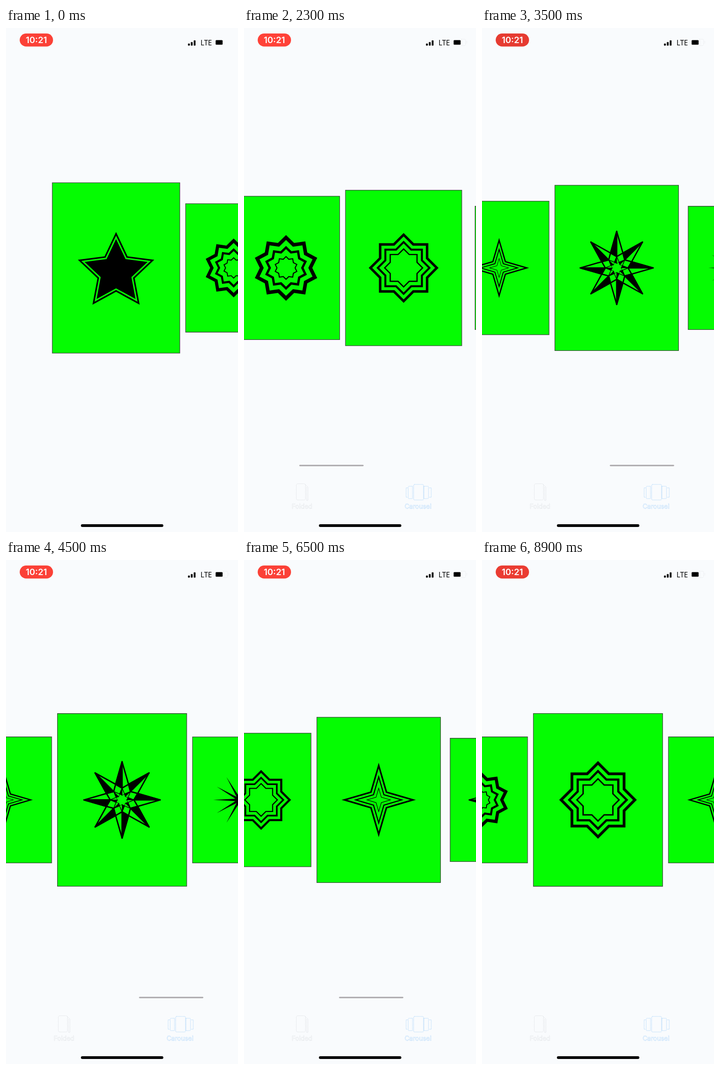
An HTML page that plays this animation: 508 by 1102 pixels, repeating every 9000 ms.

```html
<!DOCTYPE html>
<html lang="en">
<head>
<meta charset="utf-8">
<title>Card carousel</title>
<style>
  html, body { margin: 0; width: 100%; height: 100%; overflow: hidden; background: #f9fbfd; }
  svg { display: block; width: 100vw; height: 100vh; }
  .tab { fill: none; stroke-width: .7; stroke-dasharray: 1.5 1.2; }
  .tab text { font: 14px Inter, sans-serif; text-anchor: middle; stroke-width: .5; }
</style>
</head>
<body>
<svg viewBox="0 0 508 1102">
  <rect width="508" height="1102" fill="#f9fbfd"/>
  <g id="cards"></g>
  <rect id="bar" y="955" height="3.2" rx="1.6" fill="#b0adb0"/>

  <rect id="pill" x="30" y="12" width="73" height="28.5" rx="14.2"/>
  <text x="66.5" y="33.3" font-family="Inter, sans-serif" font-size="19" font-weight="600" fill="#fff" text-anchor="middle">10:21</text>
  <g>
    <rect x="398.5" y="34" width="4" height="4.5" rx="1"/>
    <rect x="404.7" y="30.8" width="4" height="7.7" rx="1"/>
    <rect x="411" y="27" width="4" height="11.5" rx="1"/>
    <text x="426" y="37.5" font-family="Noto Sans, sans-serif" font-size="15.4">LTE</text>
    <rect x="459" y="26.5" width="15.3" height="10" rx="1.5"/>
  </g>

  <g id="faint">
    <path d="M475 24.5H482.5Q485.5 24.5 485.5 27.5V35.5Q485.5 38.5 482.5 38.5H475M488 29.5V33.5"
      fill="none" stroke="#dfe1e4" stroke-width=".8" stroke-dasharray="2 1.5"/>
    <g class="tab" stroke="#cfd2d6">
      <rect x="114.5" y="996.5" width="20" height="35.5" rx="3"/>
      <path d="M134 998L140 1004V1033H137V1003"/>
      <text x="127" y="1051">Folded</text>
    </g>
    <g class="tab" stroke="#7dbdf8">
      <rect x="371.5" y="998" width="21.5" height="34" rx="2"/>
      <path d="M369 1002H361Q359.5 1002 359.5 1004V1027Q359.5 1029 361 1029H369ZM358 1005.5H355V1026H358M394 1002H402Q404 1002 404 1004V1027Q404 1029 402 1029H394ZM406 1005.5H410V1026H406"/>
      <text x="381" y="1051">Carousel</text>
    </g>
  </g>
  <rect x="164" y="1085" width="180.5" height="6" rx="3"/>
</svg>
<script>
const LOOP = 9000, STEP = 100;
const MID_X = 254, MID_Y = 524.6, PITCH = 257.5;
const CARD_W = 283, CARD_H = 377.8, SHRINK = 0.00105, MIN_SCALE = 0.714;
const GREEN = '#05fc02', BLACK = '#000';
const $ = id => document.getElementById(id);

const polar = (r, deg) => {
  const a = deg * Math.PI / 180;
  return [r * Math.sin(a), -r * Math.cos(a)];
};
const poly = (pts, fill, extra = '') =>
  `<polygon points="${pts.map(p => p.map(v => v.toFixed(2)).join()).join(' ')}" fill="${fill}" ${extra}/>`;

function star(n, tip, notch, fill) {
  const pts = [];
  for (let i = 0; i < 2 * n; i++) pts.push(polar(i % 2 ? notch : tip, i * 180 / n));
  return poly(pts, fill);
}

// Nested stars, alternating black and green from the outside in
const rings = (n, ratio, radii) =>
  radii.map((r, i) => star(n, r, r * ratio, i % 2 ? GREEN : BLACK)).join('');

// Eight outlined kites; the counterclockwise half takes the given fill
function kites(tip, side, base, turn, line, fill) {
  const edge = `stroke="#000" stroke-width="${line}" stroke-linejoin="round"`;
  let out = '';
  for (let a = turn; a < 360 + turn; a += 45) {
    const end = polar(tip, a), foot = polar(base, a);
    const left = polar(side, a - 22.5), right = polar(side, a + 22.5);
    out += poly([end, right, foot, left], GREEN, edge);
    if (fill !== GREEN) out += poly([end, left, foot], fill, edge);
  }
  return out;
}

const compass =
  kites(37, 26, 14, 22.5, 1.8, GREEN) +
  kites(25, 14, 10, 0, 1, BLACK) +
  kites(83.5, 37, 26, 0, 3, BLACK);

const art = [
  `<g transform="translate(0 9.4)">${rings(5, 0.488, [89.2, 81, 73.5])}</g>`,
  rings(10, 0.8, [86.5, 73.5, 58, 49.5, 31.8, 28]),
  rings(8, Math.SQRT1_2 / Math.cos(Math.PI / 8), [85, 76.5, 66.3, 59.5, 48.3, 44]),
  rings(4, 0.32, [85, 72, 57.2, 48, 29, 24.5]),
  compass,
  star(12, 79.5, 13.5, BLACK)
];

$('cards').innerHTML = art.map(a => `<g>
  <rect x="${-CARD_W / 2}" y="${-CARD_H / 2}" width="${CARD_W}" height="${CARD_H}" fill="${GREEN}"
    stroke="#3c4a3c" stroke-width="1.3" vector-effect="non-scaling-stroke"/>${a}</g>`).join('');
const cards = [...$('cards').children];

const clamp = v => Math.max(0, Math.min(1, v));
const ease = (t, from, to) => {
  const k = clamp((t - from) / (to - from));
  return k * k * (3 - 2 * k);
};
// Remaining distance of a decelerating fling, stopping once it is tiny
const glide = (dist, t, tau) => Math.max(0, (dist + 0.02) * Math.exp(-t / tau) - 0.02);

// Scroll position in cards, t in seconds
function scrollAt(t) {
  if (t < 4.7) {
    const rest = 0.0505 * (1 - ease(t, 0.1, 0.9));
    return Math.max(rest, 4 - glide(2.371, t - 2.3, 0.463));
  }
  const bounce = 0.047 * Math.exp(-(t - 5.4) / 0.14);
  const ahead = t < 5.2 ? 4 + 1.196 * ease(t, 4.7, 5.2) : 5 + bounce;
  return Math.min(ahead, 2 + glide(0.841, t - 6.5, 0.495));
}

function draw(ms) {
  const t = Math.floor(ms / STEP) * STEP / 1000;
  const pos = scrollAt(t);

  cards.forEach((card, i) => {
    const dx = (i - pos) * PITCH;
    const scale = Math.max(MIN_SCALE, 1 - SHRINK * Math.abs(dx));
    card.setAttribute('transform', `translate(${MID_X + dx} ${MID_Y}) scale(${scale})`);
  });

  const over = Math.max(0, pos - 5) * PITCH;
  const bar = $('bar');
  bar.setAttribute('x', 4 + 71.8 * Math.min(pos, 5) + over);
  bar.setAttribute('width', 141 - over);
  bar.setAttribute('opacity', clamp((t - 0.1) / 0.2) * (1 - clamp((t - 8.5) / 0.3)));

  const glow = 0.5 + 0.5 * Math.cos(Math.PI * (t - 0.25));
  const mix = (a, b) => Math.round(a + (b - a) * glow);
  $('pill').setAttribute('fill', `rgb(${mix(226, 255)},${mix(58, 66)},${mix(48, 56)})`);
  $('faint').setAttribute('opacity', t < 0.1 ? 0 : 1);
}

const start = performance.now();
function tick() {
  draw((performance.now() - start) % LOOP);
  requestAnimationFrame(tick);
}
tick();
</script>
</body>
</html>
```
